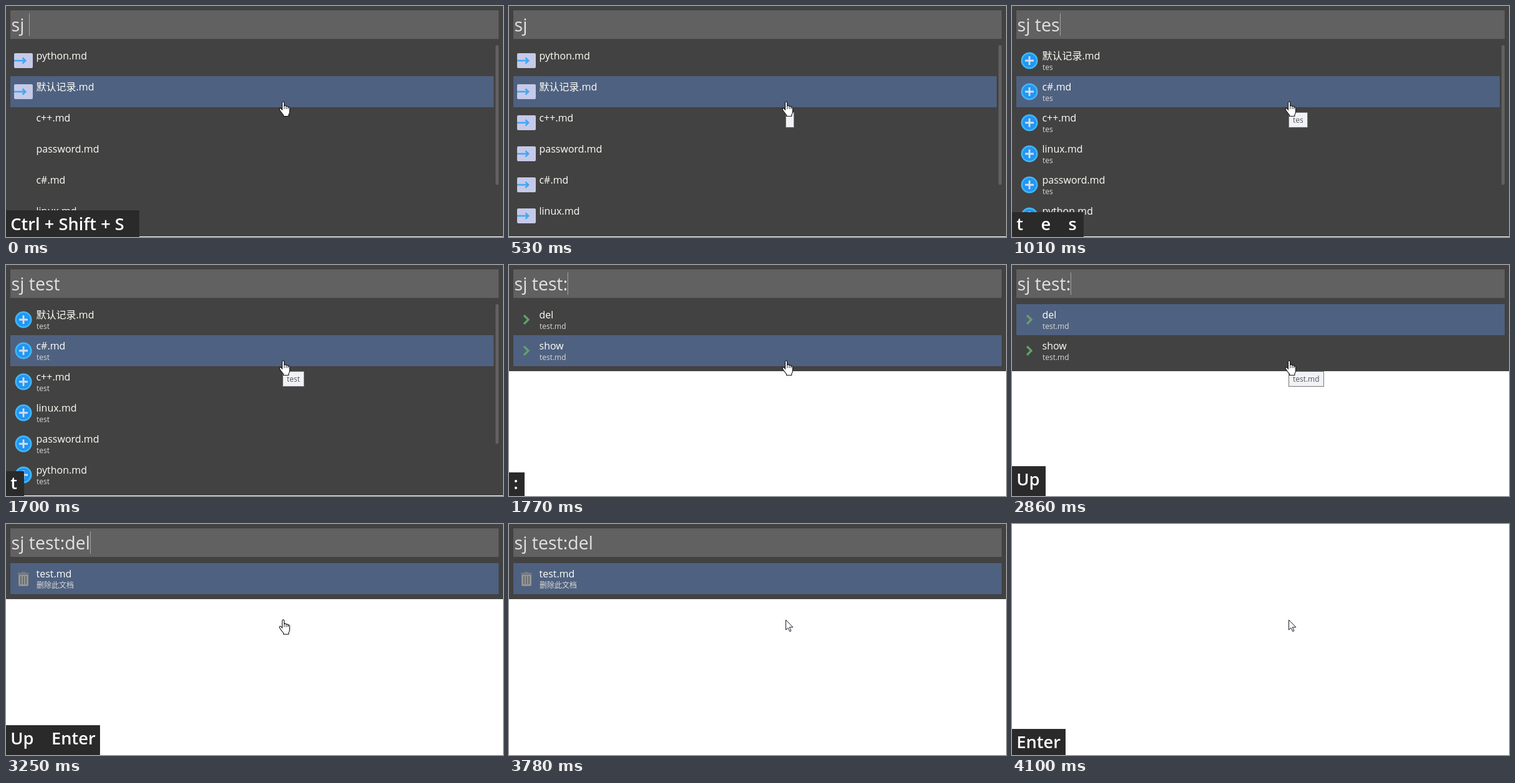
Animation, 798 px wide and 372 px high, one loop 4180 ms. Source, as an HTML page:

```html
<!DOCTYPE html>
<html lang="zh-CN">
<head>
<meta charset="utf-8">
<style>
html, body { margin: 0; width: 100%; height: 100%; overflow: hidden; background: #fff; }
svg { display: block; width: 798px; height: 372px; font-family: "Open Sans", "Noto Sans CJK SC", "Noto Sans CJK", "Noto Sans", sans-serif; }
text { white-space: pre; }
.query { font-size: 28.6px; fill: #e3e0e3; }
.title { font-size: 16px; fill: #fffff8; }
.sub { font-size: 12px; fill: #d9d9d4; }
.tip { font-size: 12px; fill: #575757; }
.keys { font-size: 27.3px; font-weight: 600; fill: #fff; }
</style>
</head>
<body>
<svg id="stage" viewBox="0 0 798 372"></svg>
<script>
const LOOP = 4180;
const stage = document.getElementById('stage');

// Each track lists [start time, value]; a value holds until the next one.
const tracks = {
  query: [[0, 'sj '], [800, 'sj t'], [850, 'sj te'], [1010, 'sj tes'], [1160, 'sj test'],
    [1770, 'sj test:'], [3170, 'sj test:del']],
  caret: [[0, true], [530, false], [800, true], [1700, false], [1770, true], [2400, false],
    [2860, true], [3780, false]],
  view: [[0, 'files'], [800, 'append'], [1770, 'actions'], [3240, 'confirm'], [4100, 'closed']],
  icons: [[0, 2], [80, 6]],
  selected: [[0, 1], [2780, 0]],
  tip: [[0, null], [530, ''], [800, 't'], [850, 'te'], [1010, 'tes'], [1160, 'test'],
    [1770, null], [2400, 'test.md'], [3240, null]],
  pointer: [[0, 'hand'], [3780, 'arrow']],
  keys: [[0, 'Ctrl + Shift + S'], [460, ''], [800, 't'], [850, 't    e'], [1010, 't    e    s'],
    [1160, 't    e    s    t'], [1390, 'e    s    t'], [1470, 's    t'], [1620, 't'], [1770, ':'],
    [2400, ''], [2780, 'Up'], [3170, 'Up    Enter'], [3400, 'Enter'], [3780, ''], [4100, 'Enter']]
};

// Key badge: width and top edge
const badges = {
  'Ctrl + Shift + S': [214, 329], 'Enter': [86, 330], 'Up': [54, 324], 'Up    Enter': [151, 324],
  't': [29, 332], ':': [25, 334], 't    e': [73, 332], 't    e    s': [115, 332],
  't    e    s    t': [155, 332], 'e    s    t': [116, 332], 's    t': [71, 332]
};

const views = {
  files: { icon: 'enter', titles: ['python.md', '默认记录.md', 'c++.md', 'password.md', 'c#.md', 'linux.md'] },
  append: { icon: 'plus', titles: ['默认记录.md', 'c#.md', 'c++.md', 'linux.md', 'password.md', 'python.md'] },
  actions: { icon: 'chevron', titles: ['del', 'show'], sub: 'test.md' },
  confirm: { icon: 'bin', titles: ['test.md'], sub: '删除此文档' }
};

// Icons are centred on 0,0
const icons = {
  enter: `<rect x="-15" y="-12" width="30" height="24" rx="2" fill="#c5cae9"/>
    <path d="M-15 0H2M-1.5-4.7 3.2 0-1.5 4.7" fill="none" stroke="#42a5f5" stroke-width="2.6"/>`,
  plus: `<circle r="13.5" fill="#42b8f8"/><circle r="11" fill="#2196f3"/>
    <path d="M-7 0H7M0-7V7" stroke="#d5dde8" stroke-width="2.8"/>`,
  chevron: `<path d="M-4-7 3 0-4 7" fill="none" stroke="#65a168" stroke-width="3.2"/>`,
  bin: `<path d="M-9-9.5H8.500V-7H-9ZM-3-11H3V-9H-3Z" fill="#777b7d"/>
    <path d="M-8-6.500H8V9.500Q8 12 5.500 12H-5.500Q-8 12-8 9.500Z" fill="#929594"/>
    <path d="M-4-4V9M0-4V9M4-4V9" stroke="#666a6c" stroke-width="1.8"/>`
};

const pointers = {
  hand: `<path d="M443.5 156Q443.5 154 445 154T446.700 156V161.500Q447 160 448.500 160.200T450 162
    Q450.500 161 451.700 161.300T453 163Q453.500 162.200 454.500 162.700T455.500 164.500V170
    Q455.500 173 453.800 175V177.500H445.500V175.500Q442.500 172 440.500 169Q438.300 166 439.500 165
    T443.500 167Z" fill="#fff" stroke="#111" stroke-width="1.1"/>
    <path d="M446.800 161V166M450 162V166M453 163V166" stroke="#111" stroke-width=".9"/>`,
  arrow: `<path d="M444.500 154.500V170.500L448 167.300 450.800 173 453 172 450.300 166.200H455.800Z"
    fill="#fff" stroke="#181828"/>`
};

const valueAt = (track, t) => track.reduce((held, [start, v]) => t >= start ? v : held, track[0][1]);
const rect = (x, y, w, h, fill, extra = '') =>
  `<rect x="${x}" y="${y}" width="${w}" height="${h}" fill="${fill}" ${extra}/>`;
const text = (cls, x, y, s) => `<text class="${cls}" x="${x}" y="${y}">${s}</text>`;

function launcher(s) {
  const { icon, titles, sub } = views[s.view];
  const scrolls = titles.length > 5;
  const caption = sub || s.query.slice(3);
  let out = rect(0, 0, 798, 71 + 50 * titles.length, '#424242')
    + rect(7, 7, 784, 46, '#616161')
    + text('query', 8.5, 41, s.query)
    + rect(7, 63 + 50 * s.selected, scrolls ? 776 : 784, 50, '#4f6180');
  if (scrolls) out += rect(786, 63, 5, 225, '#616161', 'rx="2.5"');
  titles.forEach((title, i) => {
    const y = 63 + 50 * i;
    if (i < s.icons) out += `<g transform="translate(28 ${y + 25})">${icons[icon]}</g>`;
    out += text('title', 48.5, y + 23, title) + text('sub', 49, y + 40, caption);
  });
  return out;
}

function badge(keys) {
  const [width, top] = badges[keys];
  return rect(0, top, width, 372 - top, '#2a2a2a')
    + text('keys', 7.3, keys.startsWith('Up') ? 355 : 361, keys);
}

function draw(s) {
  let out = s.view === 'closed' ? '' : launcher(s);
  if (s.tip !== null) out += '<g id="tip"></g>';
  out += pointers[s.pointer];
  if (s.keys) out += badge(s.keys);
  stage.innerHTML = rect(0, 0, 798, 372, '#fff') + out;

  const query = stage.querySelector('.query');
  if (query && s.caret) {
    const x = Math.round(8.5 + query.getComputedTextLength());
    query.insertAdjacentHTML('afterend', rect(x, 12, 1, 36, '#a5a4a5'));
  }
  const tip = stage.querySelector('#tip');
  if (tip) {
    tip.innerHTML = text('tip', 451, 188, s.tip);
    const width = Math.round(tip.firstChild.getComputedTextLength()) + 13;
    tip.insertAdjacentHTML('afterbegin',
      rect(444.5, 171.5, width, 24, '#f1f2f7', 'stroke="#767676"'));
  }
}

let shown = '';
function tick(now) {
  const t = now % LOOP;
  const state = { selected: 0 };
  for (const name in tracks) state[name] = valueAt(tracks[name], t);
  const key = JSON.stringify(state);
  if (key !== shown) {
    shown = key;
    draw(state);
  }
}

const origin = performance.now();
function frame() {
  tick(performance.now() - origin);
  requestAnimationFrame(frame);
}
frame();
</script>
</body>
</html>
```
